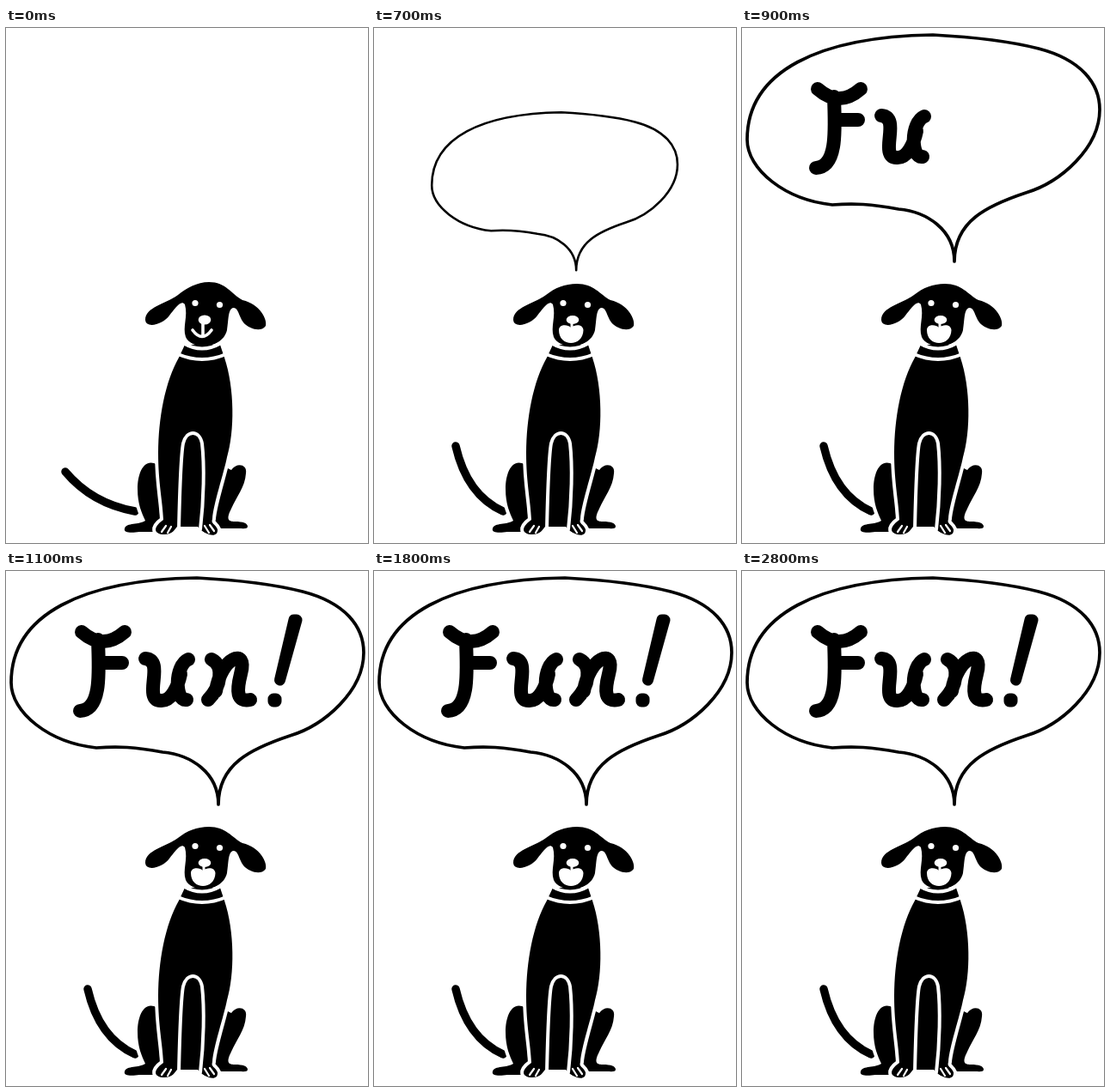
Animation of 421x600 px, one loop 3.3 s. Source, as an HTML page with a canvas:

```html
<!DOCTYPE html>
<html lang="en">
<head>
<meta charset="utf-8">
<title>Fun!</title>
<style>
  html, body { margin: 0; width: 100%; height: 100%; overflow: hidden; background: #fff; }
  canvas { display: block; }
</style>
</head>
<body>
<canvas id="stage" width="421" height="600" role="img" aria-label="A dog says Fun!"></canvas>
<script>
const LOOP = 3300;
const BLACK = '#000', WHITE = '#fff';
const ctx = document.getElementById('stage').getContext('2d');

function fill(path, color = BLACK) {
  ctx.fillStyle = color;
  ctx.fill(new Path2D(path));
}

function stroke(path, width, color = BLACK) {
  ctx.strokeStyle = color;
  ctx.lineWidth = width;
  ctx.stroke(new Path2D(path));
}

function oval(x, y, rx, ry = rx) {
  ctx.fillStyle = WHITE;
  ctx.beginPath();
  ctx.ellipse(x, y, rx, ry, 0, 0, 2 * Math.PI);
  ctx.fill();
}

// Black shape with a white rim that cuts into whatever lies behind it.
function cutout(path) {
  stroke(path, 8, WHITE);
  fill(path);
}

const haunches = [
  'M176 509C161 500 153 518 153 537C153 555 158 565 162 574C155 579 140 576 138 583C136 589 148 588 155 587H180Z',
  'M262 515C268 506 281 508 279 519C278 535 268 546 262 560C256 572 258 575 266 575' +
    'C276 575 281 577 281 581C281 584 275 583 270 583H240V540L252 510Z'
];

const body = 'M208 369L201 384C185 412 177 455 177 495C177 530 182 550 183 573' +
  'C170 582 172 590 184 590C194 590 196 584 199 581H223C230 590 247 596 246 584' +
  'C243 577 238 578 240 572C241 555 253 520 257 500C266 470 266 420 254 384L249 369Z';

const arch = 'M201 584C202 540 203 500 206 484C210 468 225 468 228 484C231 510 230 550 226 584';
const toes = 'M186 580L181 587M192 581L188 588M231 580L236 588M237 579L242 586';
const collar = 'M206 367Q228 380 250 367M200 380Q228 392 256 380';
const smile = 'M217 352Q228 367 239 352M229 344V358';
const grin = 'M229 349C225 345 215 345 215 352C215 372 243 372 243.5 352C243 345 234 345 229 349Z';

const head = top => `M236 ${top}C256 ${top} 262 310 275 317C296 322 304 340 302 347` +
  'C298 354 284 352 276 343C270 334 270 325 264 326C258 328 259 340 257 352' +
  'C252 374 216 376 209 360C205 348 212 336 208 322C203 316 196 328 190 335' +
  `C183 345 163 351 162 340C162 325 185 322 200 311C210 303 222 ${top} 236 ${top}Z`;

const bubble = 'M247 272C247 235 215 214 182 211C150 205 130 204 105 206C50 200 6 165 6 130' +
  'C6 50 90 10 222 8C260 10 310 15 345 24C395 37 416 65 416 95' +
  'C416 140 370 180 330 192C285 207 247 225 247 272';

const letters = [
  'M88 71Q113 93 138 71M107 80C108 115 112 162 86 163M108 107H135',
  'M162 102C186 104 158 150 180 151C192 152 200 135 203 120M212 103C196 110 196 152 210 150',
  'M235 150C250 135 254 110 239 103M244 140C250 100 282 88 273 120C268 140 268 153 284 150',
  'M335 57L338 57L318.5 127ZM311 149h3v3h-3Z'
];

function drawTail(lift) {
  const tip = `${69 + 13 * lift} ${517 - 15 * lift}`;
  const bend = `${100 + 4 * lift} ${554 - 5 * lift}`;
  stroke(`M${tip}Q${bend} 150 563`, 9.5);
}

function drawDog(lift, talking) {
  drawTail(lift);
  haunches.forEach(cutout);
  cutout(body);
  stroke(arch, 4, WHITE);
  stroke(toes, 2.2, WHITE);
  fill(head(talking ? 298 : 296));
  stroke(collar, 4, WHITE);
  oval(220, 320.5, 3.6);
  oval(248.5, 322.5, 3.6);
  oval(231, 340, 7.3, talking ? 5 : 5.5);
  if (talking) {
    stroke('M230 342V349', 3, WHITE);
    fill(grin, WHITE);
  } else {
    stroke(smile, 3.6, WHITE);
  }
}

// The bubble grows in three steps out of the dog's mouth.
function drawBubble(step) {
  const rest = 1 - Math.min(1, 0.39 + 0.307 * step);
  ctx.save();
  ctx.translate(208 * rest, 306 * rest);
  ctx.scale(1 - rest, 1 - rest);
  stroke(bubble, 3.7);
  ctx.restore();
}

function tailLift(t) {
  if (t < 600) return 0;
  if (t < 700) return 1;
  if (t < 1300) return 2;
  return 1 + Math.floor((t - 1300) / 500) % 2;
}

function drawWord(count, hop) {
  ctx.save();
  ctx.translate(0, hop);
  letters.slice(0, count).forEach((path, i) => stroke(path, i < 3 ? 16 : 13));
  ctx.restore();
}

function draw(t) {
  ctx.fillStyle = WHITE;
  ctx.fillRect(0, 0, 421, 600);
  ctx.lineCap = ctx.lineJoin = 'round';
  const step = Math.floor((t - 600) / 100);
  drawDog(tailLift(t), step >= 0);
  if (step < 0) return;
  drawBubble(step);
  drawWord(Math.max(0, step - 1), step === 6 ? -9 : 0);
}

const start = performance.now();
function tick() {
  draw((performance.now() - start) % LOOP);
  requestAnimationFrame(tick);
}
tick();
</script>
</body>
</html>
```
